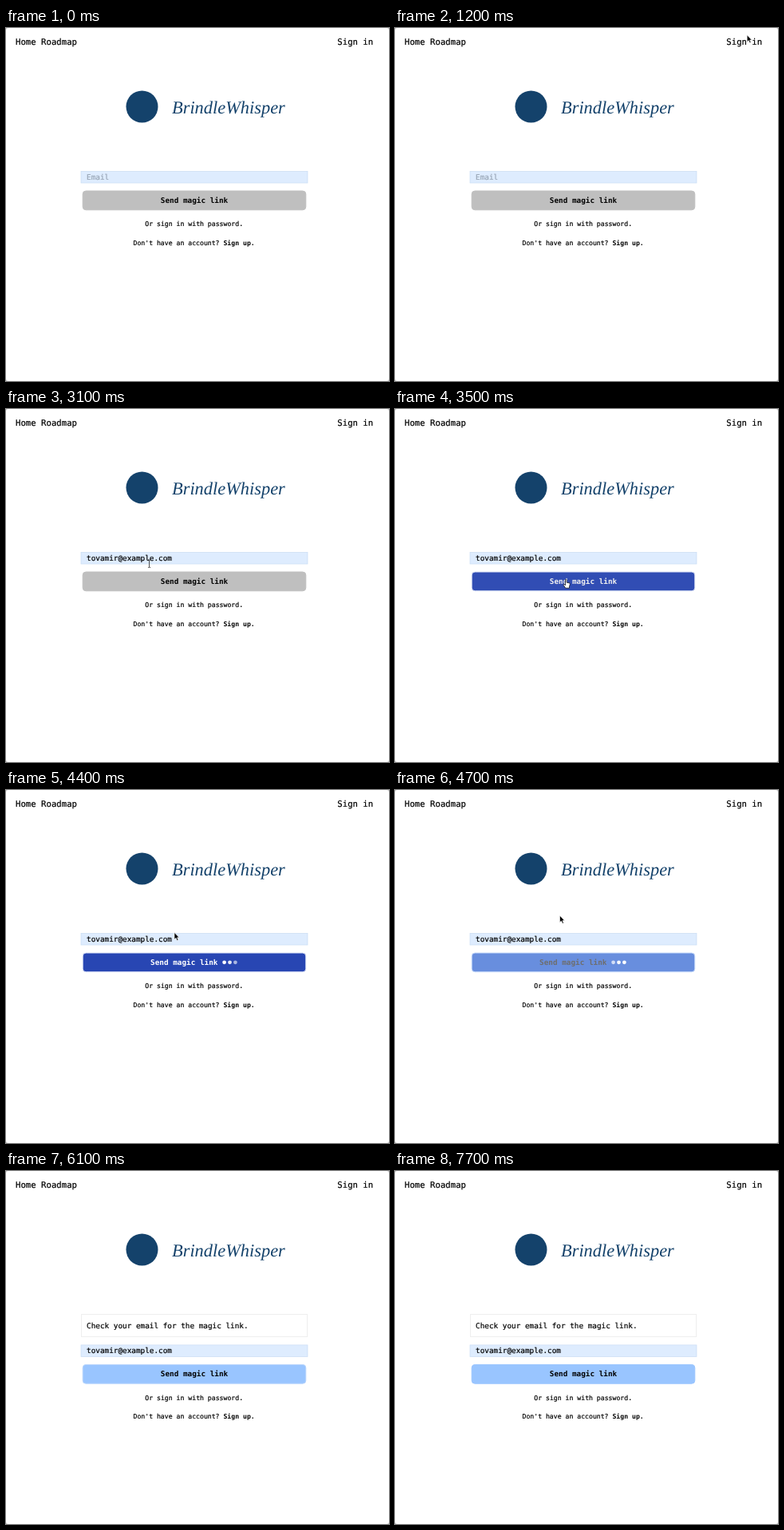
Recreate the animation shown at these times as an HTML page. Size 480x442 px, loop 8000 ms.

```html
<!DOCTYPE html>
<html lang="en">
<head>
<meta charset="utf-8">
<title>Magic link sign-in</title>
<style>
  html, body { margin: 0; width: 100%; height: 100%; overflow: hidden; background: #fff; }
  svg { display: block; width: 100%; height: 100%; }
  text {
    font-family: "DejaVu Sans Mono", monospace; font-size: 9.36px; white-space: pre;
    text-rendering: geometricPrecision; stroke: currentColor; stroke-width: .2px;
  }
  .nav { font-size: 10.67px; }
  .small { font-size: 8.17px; }
  .bold { font-weight: bold; stroke: none; }
  .brand { font: italic 22.4px "Liberation Serif", serif; fill: #14426b; stroke: none; }
</style>
</head>
<body>
<svg viewBox="0 0 480 442">
  <rect width="480" height="442" fill="#c4c4c4"/>
  <rect width="480" height="442" rx="3" fill="#fff"/>
  <text class="nav" x="12" y="21">Home Roadmap</text>
  <text class="nav" x="415.3" y="21">Sign in</text>

  <circle cx="170.5" cy="98.5" r="20" fill="#14426b"/>
  <text class="brand" x="208" y="107">BrindleWhisper</text>

  <g id="notice">
    <rect x="94.5" y="179.5" width="283" height="28" fill="#fff" stroke="#eee"/>
    <text x="101" y="197">Check your email for the magic link.</text>
  </g>

  <g id="form">
    <rect x="94" y="179.5" width="284" height="14.5" fill="#deecfe" stroke="#c8dcf3" stroke-width=".7"/>
    <text id="email" x="101" y="190"></text>
    <rect id="button" x="96.2" y="204" width="279.6" height="23.8" rx="4"/>
    <text id="label" class="bold" y="219">Send magic link</text>
    <g id="dots" fill="#fff">
      <circle cx="273.6" cy="215.8" r="2.4"/>
      <circle cx="280.5" cy="215.8" r="2.4"/>
      <circle cx="287.4" cy="215.8" r="2.4"/>
    </g>
    <text class="small" x="174.3" y="248.3">Or sign in with password<tspan class="bold">.</tspan></text>
    <text class="small" x="159.5" y="271.5">Don't have an account? <tspan class="bold">Sign up.</tspan></text>
  </g>

  <g id="pointer">
    <path id="arrow" d="M0 0V8.6L2 6.8L3.4 10L4.9 9.3L3.5 6.3H6Z" fill="#000" stroke="#fff" stroke-width=".6"/>
    <path id="beam" d="M-1.5 -5Q0 -5 0 -4Q0 -5 1.5 -5M0 -4V4M-1.5 5Q0 5 0 4Q0 5 1.5 5" fill="none" stroke="#222" stroke-width=".8"/>
    <path id="hand" d="M-.8 .6Q0 -.4 .8 .6V4L4 4.6Q5.2 5 5 6.5L4.2 9V11H-.6L-3.3 7Q-3.2 5.7 -2 6.3L-.8 7.5Z" fill="#fff" stroke="#000" stroke-width=".7" stroke-linejoin="round"/>
  </g>
</svg>
<script>
const LOOP = 8000, STEP = 100;
const ADDRESS = "tovamir@example.com";
const GREY = [191, 191, 191], DARK = [40, 70, 179], LIGHT = [153, 197, 255];
const WHITE = [255, 255, 255], BLACK = [0, 0, 0];
const RING_DARK = [222, 229, 249], RING_LIGHT = [184, 213, 253];

// time, x, y
const PATH = [
  [600, 428, -4], [1000, 438, 12], [1500, 446, 4], [1800, 312, 92],
  [2100, 184.6, 164], [2300, 168, 187], [3000, 168, 187], [3400, 214.3, 213.2],
  [3950, 214.3, 213.2], [4400, 211, 178.5], [4800, 205, 150], [5100, 205, 150]
];

const $ = id => document.getElementById(id);
const clamp = v => Math.min(1, Math.max(0, v));
const ramp = (t, a, b) => clamp((t - a) / (b - a));
const ease = p => p * p * (3 - 2 * p);
const mix = (a, b, p) => a + (b - a) * p;
const blend = (a, b, p) => a.map((v, i) => mix(v, b[i], p));
const rgb = c => `rgb(${c.map(Math.round)})`;
const show = (id, on) => $(id).setAttribute("display", on ? "inline" : "none");

function pointerAt(t) {
  const i = PATH.findIndex(k => k[0] > t);
  if (i < 1) return null;
  const [t0, x0, y0] = PATH[i - 1], [t1, x1, y1] = PATH[i];
  const p = ramp(t, t0, t1);
  return [mix(x0, x1, p), mix(y0, y1, p)];
}

function typedCount(t) {
  if (t < 2400) return 0;
  return t < 3100 ? Math.min(14, 2 + 3 * (t - 2400) / STEP) : ADDRESS.length;
}

function drawPointer(t) {
  const pos = pointerAt(t);
  const typing = t >= 2400 && t < 3100;
  show("pointer", pos && !typing);
  if (!pos) return;
  const [x, y] = pos;
  const overButton = y > 204 && y < 228;
  const overInput = y > 180 && y < 195;
  $("pointer").setAttribute("transform", `translate(${x} ${y})`);
  show("hand", overButton);
  show("beam", overInput);
  show("arrow", !overButton && !overInput);
}

function drawButton(t) {
  const hover = ease(ramp(t, 3100, 3570));
  const leave = ease(ramp(t, 4400, 4950));
  const fill = blend(blend(GREY, DARK, hover), LIGHT, leave);
  const ring = blend(blend(GREY, RING_DARK, hover), RING_LIGHT, leave);
  const button = $("button"), label = $("label");
  button.setAttribute("fill", rgb(fill));
  button.setAttribute("stroke", rgb(blend(ring, LIGHT, ramp(t, 6100, 6600))));
  label.setAttribute("fill", rgb(blend(blend(BLACK, WHITE, hover), BLACK, leave)));

  const sending = t >= 3950 && t < 6100;
  label.setAttribute("x", sending ? 181 : 193.8);
  show("dots", sending);
  [...$("dots").children].forEach((dot, i) => {
    const phase = 2 * Math.PI * (t - 4400 - 180 * i) / 1500;
    dot.setAttribute("opacity", .58 + .42 * Math.cos(phase));
  });
}

function draw(t) {
  const sent = t >= 6100, count = typedCount(t);
  show("notice", sent);
  $("form").setAttribute("transform", `translate(0 ${sent ? 38.4 : 0})`);
  $("email").textContent = count ? ADDRESS.slice(0, count) : "Email";
  const ink = count ? "#000" : "#98a5b5";
  $("email").setAttribute("fill", ink);
  $("email").setAttribute("color", ink);
  drawButton(t);
  drawPointer(t);
}

const start = performance.now();
function tick() {
  const t = (performance.now() - start) % LOOP;
  draw(Math.floor(t / STEP) * STEP);
  requestAnimationFrame(tick);
}
tick();
</script>
</body>
</html>
```
